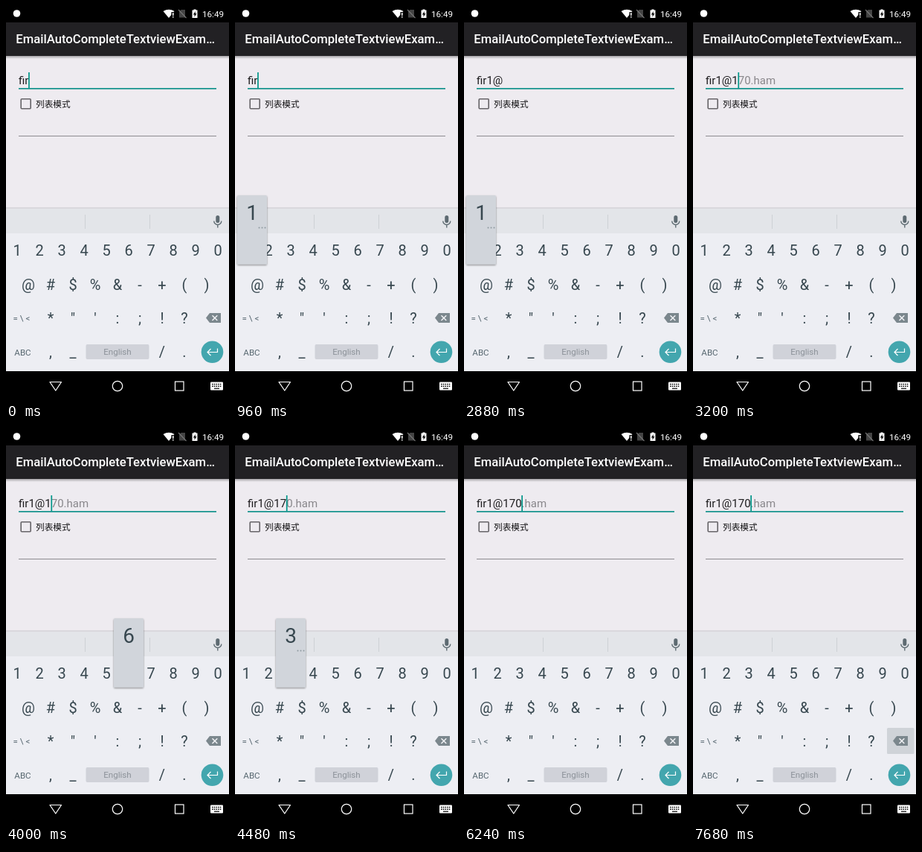
An HTML page for the animation above (8 s loop, 300 px wide and 530 px high).

```html
<!DOCTYPE html>
<html lang="en">
<head>
<meta charset="utf-8">
<title>Email auto-complete</title>
<style>
  html, body { margin: 0; width: 100%; height: 100%; overflow: hidden; background: #000; }
  svg { display: block; width: 300px; height: 530px; font-family: Roboto, sans-serif; }
  text { white-space: pre; }
  .key { font-size: 20px; fill: #37474f; text-anchor: middle; }
  .small { font-size: 11.6px; fill: #56666f; text-anchor: middle; }
  .big { font-size: 28px; fill: #37474f; text-anchor: middle; }
  .field { font-size: 15px; fill: #1d1c1e; }
  .line { fill: none; stroke: #fff; stroke-width: 1.2; }
</style>
</head>
<body>
<svg viewBox="0 0 300 530">
  <defs>
    <linearGradient id="shade" x2="0" y2="1">
      <stop stop-color="#000" stop-opacity=".3"/>
      <stop offset="1" stop-color="#000" stop-opacity="0"/>
    </linearGradient>
    <filter id="lift" x="-20%" y="-10%" width="140%" height="125%">
      <feDropShadow dx="0" dy="1.2" stdDeviation="1.2" flood-opacity=".45"/>
    </filter>
  </defs>

  <rect width="300" height="530" fill="#eeebf0"/>

  <!-- status bar and title -->
  <rect width="300" height="22" fill="#000"/>
  <rect y="22" width="300" height="45" fill="#222124"/>
  <rect y="67" width="300" height="4" fill="url(#shade)"/>
  <circle cx="14.5" cy="10" r="4.8" fill="#fff"/>
  <path d="M211.500 7Q219 2.500 226.500 7L219 16Z" fill="#fff"/>
  <path d="M222.500 8h5v8h-5z" fill="#000"/>
  <path d="M224 9h1.500v4H224zM224 14h1.500v1.500H224z" fill="#fff"/>
  <path d="M235.500 5H241V15.500H233V7.500Z" fill="#444"/>
  <path d="M232 5L242.500 16" stroke="#777" stroke-width="1.1"/>
  <path d="M250.500 5.500h2V4.500h3v1h2V16h-7z" fill="#fff"/>
  <path d="M255 7L251.800 11.500H253.600V14.800L256.400 10H254.600Z" fill="#000"/>
  <text x="264" y="14.800" font-size="11.67" fill="#fff">16:49</text>
  <text x="13.300" y="50.300" font-size="16.67" font-weight="500" fill="#fff">EmailAutoCompleteTextviewExam…</text>

  <!-- form -->
  <text x="17" y="105" class="field"><tspan id="typed"></tspan><tspan id="hint" fill="#89878b"></tspan></text>
  <rect id="cursor" y="89" width="1.700" height="21" fill="#009688"/>
  <rect x="17" y="110" width="266" height="1.700" fill="#12928c"/>
  <rect x="20.200" y="124.700" width="13" height="13" rx="1" fill="none" stroke="#666468" stroke-width="1.600"/>
  <text x="40" y="135.700" font-size="11.67" fill="#151416" style="font-family:'Noto Sans CJK SC','Noto Sans CJK',sans-serif">列表模式</text>
  <rect x="17" y="174" width="266" height="1" fill="#8d8b90"/>

  <!-- keyboard -->
  <rect y="270" width="300" height="2" fill="#d9d8dd"/>
  <rect y="272" width="300" height="33" fill="#e3e5e9"/>
  <rect y="305" width="300" height="185" fill="#edeef3"/>
  <path d="M106.500 280V299M193.500 280V299" stroke="#cdd1d5"/>
  <rect x="282.300" y="281" width="5" height="10" rx="2.500" fill="#5d6a71"/>
  <path d="M279.800 288.500a5 5 0 0 0 10 0M284.800 293.500V297.500" fill="none" stroke="#5d6a71" stroke-width="1.400"/>
  <g id="keys"></g>
  <rect id="pressed" x="261" y="401" width="36.500" height="35" rx="1.500" fill="#cfd3d8"/>
  <path d="M269 418.500L274 412H289V425H274Z" fill="#7b878d"/>
  <path d="M277.500 415.200L284.300 422M284.300 415.200L277.500 422" stroke="#f0f1f4" stroke-width="1.500"/>
  <rect x="107.500" y="454" width="85" height="20" rx="2" fill="#d0d2d9"/>
  <text x="150" y="468" class="small" style="fill:#8c9299">English</text>
  <circle cx="277.500" cy="464.300" r="14.800" fill="#43a6ae"/>
  <path d="M284.500 459.500V464.500H271.500M275.500 460L271 464.500L275.500 469" class="line" stroke-width="1.600"/>

  <!-- navigation bar -->
  <rect y="490" width="300" height="40" fill="#000"/>
  <path d="M59 504.500H74.500L66.800 516Z" class="line" stroke-linejoin="round"/>
  <circle cx="150" cy="510" r="6.700" class="line"/>
  <rect x="227.500" y="504" width="11.500" height="12" class="line"/>
  <rect x="275" y="504.500" width="17" height="11" rx="1" fill="#fff"/>
  <path d="M277 507.500H290M277 510.300H290" stroke="#000" stroke-width="1.400" stroke-dasharray="1.500 1.200"/>
  <path d="M280 513.200H287" stroke="#000" stroke-width="1.200"/>

  <g id="popup">
    <rect width="40" height="92.500" rx="1.500" fill="#d1d5db" filter="url(#lift)"/>
    <text x="20" y="33" class="big" id="popupChar"></text>
    <g id="more" fill="#8e999f">
      <circle cx="29.500" cy="43.500" r="1"/><circle cx="33.500" cy="43.500" r="1"/><circle cx="37.500" cy="43.500" r="1"/>
    </g>
  </g>
</svg>
<script>
const $ = id => document.getElementById(id);
const LOOP = 8000;
const ADDRESS = "fir1@170.ham";
const HINT_FROM = 6;

const POPUPS = {
  "1": { x: 3, y: 254, more: true },
  "@": { x: 10, y: 299.5 },
  "6": { x: 145, y: 254 },
  "3": { x: 55, y: 254, more: true }
};

// start time, characters typed, cursor shown, key held
const STEPS = [
  [0, 3, 1], [160, 3, 0], [640, 3, 1],
  [960, 3, 1, "1"], [1120, 4, 1, "1"], [1280, 4, 1], [1600, 4, 0],
  [2080, 4, 1, "@"], [2240, 5, 1, "@"], [2400, 5, 1],
  [2880, 5, 0, "1"], [3040, 6, 1, "1"], [3200, 6, 1], [3520, 6, 0],
  [4000, 6, 1, "6"], [4320, 7, 1, "6"],
  [4480, 7, 1, "3"], [4640, 8, 1, "3"], [4800, 8, 1],
  [5280, 8, 0], [6080, 8, 1], [7040, 8, 0], [7680, 8, 1, "delete"]
];

function addKey(label, x, y, kind = "key") {
  const key = document.createElementNS("http://www.w3.org/2000/svg", "text");
  key.setAttribute("class", kind);
  key.setAttribute("x", x);
  key.setAttribute("y", y);
  key.textContent = label;
  $("keys").append(key);
}

function addRow(labels, firstX, y) {
  [...labels].forEach((label, i) => {
    if (label !== " ") addKey(label, firstX + 30 * i, y);
  });
}

addRow("1234567890", 15, 335);
addRow("@#$%&-+()", 30, 380.5);
addRow("*\"':;!?", 60, 426);
addRow(",_   /.", 60, 471);
addKey("= \\ <", 21, 422.5, "small");
addKey("ABC", 22.5, 468.5, "small");

function show(element, visible) {
  element.style.display = visible ? "" : "none";
}

function render(time) {
  const [, count, cursorOn, held] = STEPS.findLast(step => step[0] <= time);
  $("typed").textContent = ADDRESS.slice(0, count);
  $("hint").textContent = count >= HINT_FROM ? ADDRESS.slice(count) : "";
  $("cursor").setAttribute("x", 16.7 + $("typed").getComputedTextLength());
  show($("cursor"), cursorOn);
  show($("pressed"), held === "delete");

  const popup = POPUPS[held];
  show($("popup"), popup);
  if (popup) {
    $("popup").setAttribute("transform", `translate(${popup.x} ${popup.y})`);
    $("popupChar").textContent = held;
    show($("more"), popup.more);
  }
}

function tick() {
  render(performance.now() % LOOP);
  requestAnimationFrame(tick);
}
tick();
</script>
</body>
</html>
```
